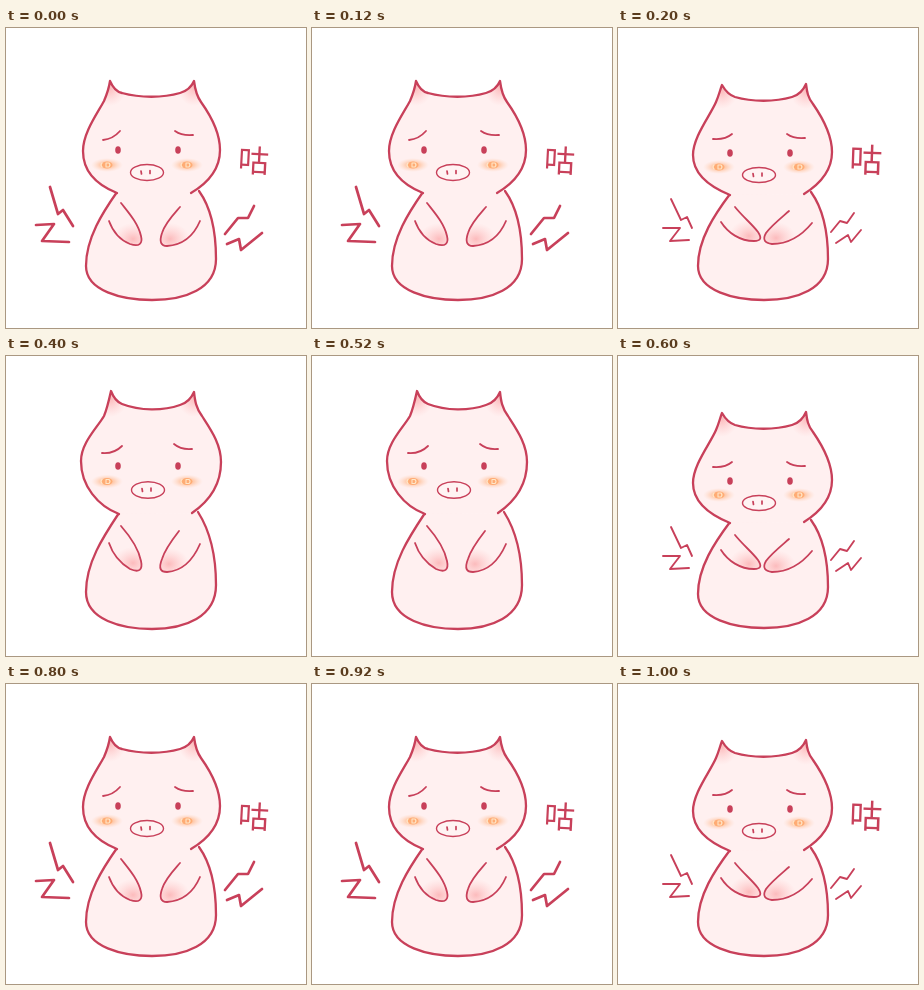
Write an HTML page that moves like this. It is 300 by 300 pixels and loops after 1200 ms.

```html
<!DOCTYPE html>
<html lang="zh">
<head>
<meta charset="utf-8">
<style>
  html, body { margin: 0; width: 100%; height: 100%; overflow: hidden; background: #fff; }
  svg { display: block; width: 100vw; height: 100vh; }
  text { font-family: "Noto Sans CJK SC", "Noto Sans CJK", sans-serif; text-anchor: middle; }
</style>
</head>
<body>
<svg id="stage" viewBox="0 0 300 300">
  <defs>
    <radialGradient id="pink">
      <stop offset="0" stop-color="#fba9ab" stop-opacity=".75"/>
      <stop offset="1" stop-color="#ffc4c4" stop-opacity="0"/>
    </radialGradient>
    <radialGradient id="blush">
      <stop offset="0" stop-color="#ffb180"/>
      <stop offset=".45" stop-color="#ffc6a4" stop-opacity=".8"/>
      <stop offset="1" stop-color="#ffdccb" stop-opacity="0"/>
    </radialGradient>
  </defs>
  <g id="art" fill="none" stroke-linecap="round" stroke-linejoin="round"></g>
</svg>
<script>
const INK = '#c8405a', SKIN = '#fff0f0', STEP = 200;
const art = document.getElementById('art');

const poses = {
  rest: {
    head: 'M111 165C91 157 77 144 77 123C77 105 91 86 98 73C101 66 103 60 104 53C107 60 111 64 116 65C134 70 157 70 174 65C181 63 185 60 188 53C189 61 190 67 195 74C205 88 214 104 214 122C214 142 202 155 185 165',
    body: 'M111 164C97 184 80 210 80 238C80 263 116 272 146 272C179 272 210 261 210 231C210 207 206 181 193 163',
    arms: ['M115 175C122 184 132 195 135 208C137 216 133 219 124 216C114 212 107 204 103 193',
           'M174 179C167 187 159 195 156 205C153 214 155 218 161 218C177 217 188 207 194 193'],
    ears: [[104, 60], [188, 60]], hands: [[127, 211], [164, 211]],
    eyes: 122, snout: [141, 144.5, 16.5, 8], blush: [101, 181, 137],
    brows: 'M97 112Q107 111 114 103M169 103Q176 108 187 107',
    bolts: 'M44 159L52 186L57 182L67 198M30 197L48 196L36 213L63 214M248 178L242 190L232 190L219 206M256 205L235 222L233 211L221 216',
    boltWidth: 2.7, word: [247.5, 144, 31, 3]
  },
  squeeze: {
    head: 'M112 167C90 158 75 146 75 127C75 109 92 88 98 74C101 67 102 62 104 57C108 64 111 67 117 69C134 74 157 74 174 69C181 67 185 63 188 56C189 64 190 70 195 76C204 89 214 107 214 124C214 142 202 156 186 166',
    body: 'M112 166C97 186 80 211 80 238C80 263 116 272 146 272C179 272 210 261 210 231C210 207 206 182 193 164',
    arms: ['M117 179C125 189 134 196 140 204C144 210 143 213 136 213C122 213 110 205 103 194',
           'M171 183C163 190 153 198 148 205C144 212 147 215 154 216C173 216 185 206 194 195'],
    ears: [[104, 63], [188, 63]], hands: [[131, 208], [158, 210]],
    eyes: 125, snout: [141, 147, 16.5, 7.5], blush: [101, 181, 139],
    brows: 'M95 111Q107 112 114 106M169 106Q176 111 187 110',
    bolts: 'M53 171L63 192L69 189L74 200M45 200L62 200L52 213L71 212M236 185L229 195L222 193L213 204M243 202L233 214L230 207L218 215',
    boltWidth: 1.9, word: [248, 144, 33, 2]
  },
  stretch: {
    head: 'M113 158C92 150 75 130 75 105C75 87 91 72 98 60C101 53 103 44 105 35C108 43 111 46 116 48C134 55 157 55 174 49C181 47 185 43 188 36C189 45 190 52 196 60C205 74 215 88 215 106C215 131 202 146 186 157',
    body: 'M113 157C97 181 80 207 80 236C80 264 116 273 146 273C179 273 210 261 210 229C210 204 206 178 192 156',
    arms: ['M115 170C122 178 132 190 135 205C137 214 133 217 124 213C114 207 107 199 103 187',
           'M173 175C166 184 159 193 156 203C152 213 155 216 161 216C176 215 187 204 194 188'],
    ears: [[105, 43], [188, 43]], hands: [[127, 207], [163, 208]],
    eyes: 110, snout: [142, 134, 16.5, 8.3], blush: [101, 181, 125.5],
    brows: 'M96 97Q108 98 116 90M168 88Q175 94 186 93'
  }
};

const cycle = [
  ['rest', true], ['squeeze', true], ['stretch', false],
  ['squeeze', false], ['rest', true], ['squeeze', true]
];

const path = (d, width = 2, fill = 'none') =>
  `<path d="${d}" stroke="${INK}" stroke-width="${width}" fill="${fill}"/>`;
const oval = (x, y, rx, ry, paint) =>
  `<ellipse cx="${x}" cy="${y}" rx="${rx}" ry="${ry}" fill="${paint}"/>`;

function cheek(x, y) {
  const shine = `M${x - 5} ${y - 2}q-2 2 0 4M${x - 1} ${y - 2}h3q2 2 0 4h-3z`;
  return oval(x, y, 16, 7, 'url(#blush)') + oval(x, y, 5.5, 3.5, '#ffac74') +
    `<path d="${shine}" stroke="#ffe6c8" stroke-width="1.1"/>`;
}

function face(p) {
  const [x, y, rx, ry] = p.snout;
  const [left, right, cheekY] = p.blush;
  return cheek(left, cheekY) + cheek(right, cheekY) + path(p.brows, 1.8) +
    oval(112, p.eyes, 2.8, 3.8, INK) + oval(172, p.eyes, 2.8, 3.8, INK) +
    `<ellipse cx="${x}" cy="${y}" rx="${rx}" ry="${ry}" fill="#fff3f3" stroke="${INK}" stroke-width="1.4"/>` +
    path(`M${x - 6} ${y - 1.5}l.5 3M${x + 3} ${y - 2}v3`, 1.7);
}

function pig(p) {
  const clip = (id, d) => `<clipPath id="${id}"><path d="${d}"/></clipPath>`;
  const glow = (spots, rx, ry) => spots.map(([x, y]) => oval(x, y, rx, ry, 'url(#pink)')).join('');
  return clip('headClip', p.head) + clip('armClip', p.arms.join('')) +
    path(p.body, 2.3, SKIN) +
    `<path d="${p.head}" fill="${SKIN}"/>` +
    `<g clip-path="url(#headClip)">${glow(p.ears, 16, 18)}</g>` + path(p.head, 2.3) +
    `<g clip-path="url(#armClip)">${glow(p.hands, 20, 16)}</g>` +
    p.arms.map(d => path(d, 1.8)).join('') + face(p);
}

function rumble(p) {
  const [x, y, size, turn] = p.word;
  return `<text x="${x}" y="${y}" font-size="${size}" fill="${INK}" transform="rotate(${turn} ${x} ${y - 12})">咕</text>`;
}

let shown = -1;
function draw(now) {
  const step = Math.floor(now / STEP) % cycle.length;
  if (step !== shown) {
    shown = step;
    const [name, loud] = cycle[step];
    const p = poses[name];
    art.innerHTML = pig(p) + (p.bolts ? path(p.bolts, p.boltWidth) : '') + (loud ? rumble(p) : '');
  }
}

let start;
function tick(now) {
  start ??= now;
  draw(now - start);
  requestAnimationFrame(tick);
}
draw(0);
requestAnimationFrame(tick);
</script>
</body>
</html>
```
